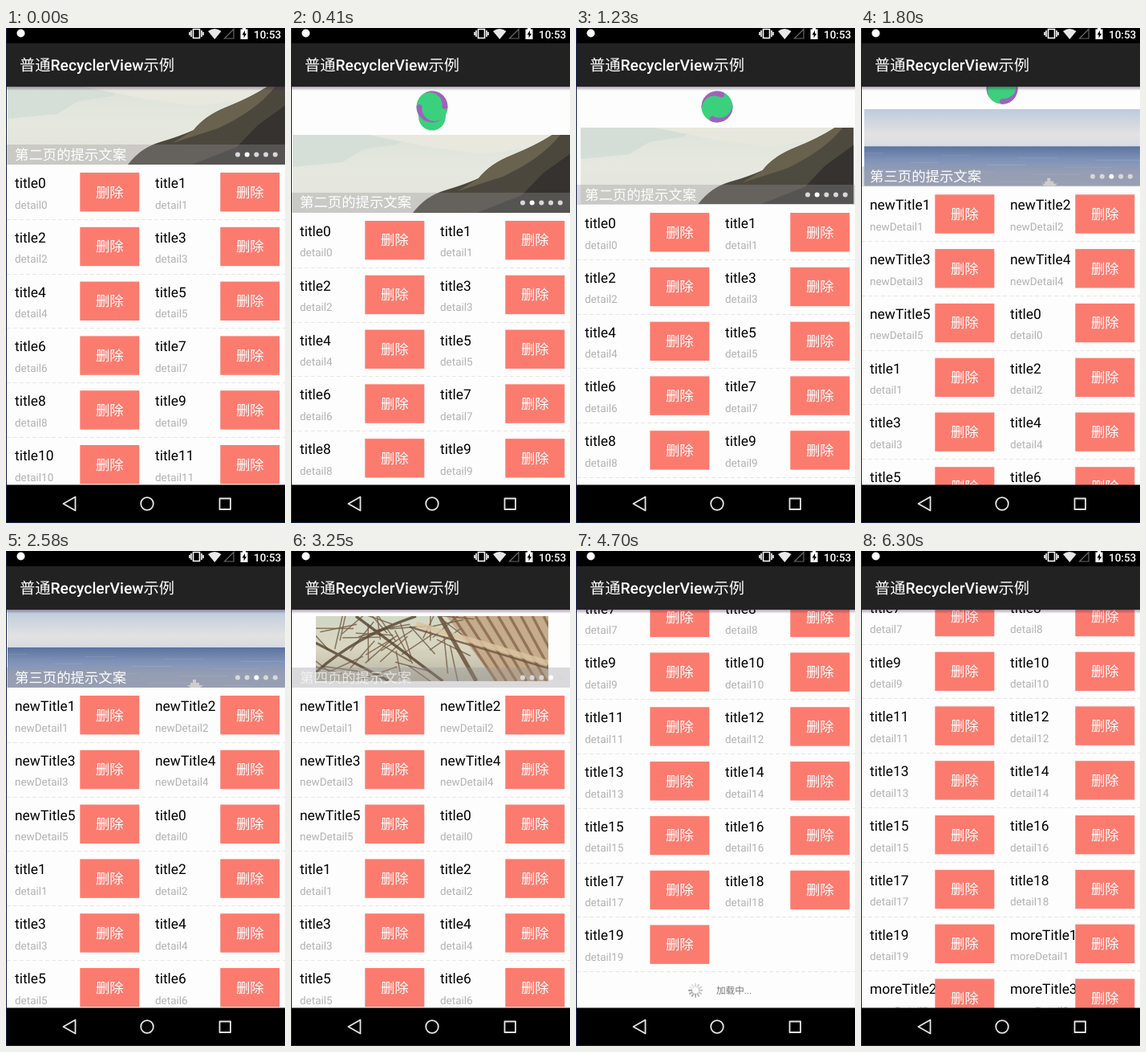
Write an HTML page with a canvas that moves like this. It is 348 px wide and 616 px high and loops after 6.36 s.

```html
<!DOCTYPE html>
<html lang="zh-CN">
<head>
<meta charset="utf-8">
<title>RecyclerView</title>
<style>
  html, body { margin: 0; width: 100%; height: 100%; overflow: hidden; background: #000; }
  canvas { display: block; }
</style>
</head>
<body>
<canvas id="stage" width="348" height="616"></canvas>
<script>
const ctx = document.getElementById('stage').getContext('2d');
const LOOP = 6360, STEP = 50, W = 348, H = 616, TOP = 73, BOTTOM = 568.5;
const BANNER_X = 2, BANNER_W = 348, BANNER_H = 97, ROW_H = 67.8;
const FAMILY = 'Roboto, "Noto Sans CJK SC", "Noto Sans CJK", sans-serif';
ctx.textRendering = 'geometricPrecision';

const clamp = x => Math.min(1, Math.max(0, x));
const ramp = (t, a, b) => { const u = clamp((t - a) / (b - a)); return u * u * (3 - 2 * u); };
const easeOut = (t, a, b) => 1 - (1 - clamp((t - a) / (b - a))) ** 3;
const noise = n => { const v = Math.sin(n * 12.9898) * 43758.5453; return v - Math.floor(v); };

function rect(x, y, w, h, color) {
  ctx.fillStyle = color;
  ctx.fillRect(x, y, w, h);
}
function disc(x, y, r, color) {
  ctx.fillStyle = color;
  ctx.beginPath();
  ctx.arc(x, y, r, 0, 7);
  ctx.fill();
}
function shape(d, color) {
  ctx.fillStyle = color;
  ctx.fill(new Path2D(d));
}
function line(d, color, width) {
  ctx.strokeStyle = color;
  ctx.lineWidth = width;
  ctx.stroke(new Path2D(d));
}
function text(s, x, y, size, color, weight = 400, align = 'left') {
  ctx.font = `${weight} ${size}px ${FAMILY}`;
  ctx.textAlign = align;
  ctx.fillStyle = color;
  ctx.fillText(s, x, y);
  return x + ctx.measureText(s).width;
}
function gradient(y0, y1, ...colors) {
  const g = ctx.createLinearGradient(0, y0, 0, y1);
  colors.forEach((c, i) => g.addColorStop(i / (colors.length - 1), c));
  return g;
}

// Banner pictures, drawn in a 348 x 97 box
function hill() {
  rect(0, 0, BANNER_W, BANNER_H, gradient(0, 97, '#dde3da', '#e6e8df', '#e2e3da'));
  shape('M0 0H150L130 12 88 18 62 34 0 40Z', '#d5dfd8');
  shape('M95 0H325L300 16 235 24 170 15Z', '#e8e8de');
  shape('M150 97Q166 76 190 69T232 54Q246 36 274 25T324 0H348V97Z', '#4b473d');
  shape('M232 54Q246 36 274 25T324 0H334Q310 30 262 52L206 70Z', '#69624f');
  shape('M348 22L312 48 286 75 230 97H348Z', '#35322f');
}
function sea() {
  rect(0, 0, BANNER_W, 49, gradient(0, 49, '#bccadd', '#d0d6df', '#e2e2e2', '#d5d9e0'));
  rect(0, 47, BANNER_W, 50, gradient(47, 97, '#5a729d', '#7d91b5', '#93a2c0', '#9aa5c0'));
  for (let i = 0; i < 14; i++)
    rect((i * 97) % 330, 55 + i * 3, 24 + (i * 13) % 40, 1, 'rgba(255,255,255,.1)');
  shape('M224 94H244L240 97H228Z M231 87H235V94H231Z M228 91H239V94H228Z', '#eceae6');
}
function girders() {
  rect(0, 0, BANNER_W, BANNER_H, gradient(0, 97, '#c9d0bc', '#d2ceb4', '#a8a58f'));
  shape('M195 0H348V97H270Z', '#c2a583');
  for (let i = 0; i < 11; i++) line(`M${205 + i * 17} 0L${270 + i * 15} 97`, '#8a6a4c', 4);
  for (let i = 0; i < 45; i++) {
    const x = noise(i) * 210, y = noise(i + 50) * 97;
    const angle = noise(i + 100) * Math.PI, dx = Math.cos(angle) * 28, dy = Math.sin(angle) * 28;
    line(`M${x - dx} ${y - dy}L${x + dx} ${y + dy}`, '#77614a', 1.8);
  }
  line('M0 84Q60 30 150 0M0 40L110 97M60 0L190 97', '#594734', 4);
  line('M150 12L348 70', '#dcc5a1', 8);
  line('M140 16L348 78', '#715640', 3);
  line('M185 0L240 97', '#675039', 6);
}
const pictures = [null, hill, sea, girders];

function picture(index, amount) {
  if (amount <= 0) return;
  ctx.save();
  ctx.globalAlpha = amount;
  ctx.translate(BANNER_W / 2, BANNER_H / 2);
  ctx.scale(amount, amount);
  ctx.translate(-BANNER_W / 2, -BANNER_H / 2);
  ctx.beginPath();
  ctx.rect(0, 0, BANNER_W, BANNER_H);
  ctx.clip();
  pictures[index]();
  ctx.restore();
}
function banner(t, y) {
  const page = 1 + ramp(t, 1140, 1845) + ramp(t, 2720, 3435);
  const from = Math.floor(page), part = page - from, current = Math.round(page);
  ctx.save();
  ctx.translate(BANNER_X, y);
  const layers = [[from, 1 - part], [from + 1, part]].sort((a, b) => a[1] - b[1]);
  layers.forEach(([index, amount]) => picture(index, amount));
  rect(-1, 72, BANNER_W, 25, 'rgba(150,146,154,.34)');
  ctx.globalAlpha = Math.abs(1 - 2 * part);
  text(`第${'一二三四五'[current]}页的提示文案`, 9, 90.5, 17.4, '#fff');
  ctx.globalAlpha = 1;
  for (let i = 0; i < 5; i++) disc(287 + i * 11.7, 84.5, 3, i === current ? '#fff' : '#d8d8da');
  ctx.restore();
}

function refreshDrop(t, pull) {
  if (pull <= 0) return;
  const R = 19.5, stretch = Math.max(0, pull - 50);
  ctx.save();
  ctx.translate(176, TOP + Math.min(pull, 50) - 25);
  if (stretch) {
    const pinch = clamp(stretch / 59), r = R - 15.5 * pinch, end = stretch + R - r;
    const bend = (R + r) / 2 - 3.5 * pinch, mid = end * .42;
    shape(`M${-R} 0Q${-bend} ${mid} ${-r} ${end}A${r} ${r} 0 0 0 ${r} ${end}Q${bend} ${mid} ${R} 0Z`, '#3bd07c');
  }
  disc(0, 0, R, '#3bd07c');
  ctx.rotate(Math.max(0, t - 1000) / 800 * Math.PI * 2.5);
  for (let i = 0; i < 2; i++) {
    shape('M19.5 1A19.5 19.5 0 0 0-12.5-15A16 16 0 0 1 12.5 1Q16 5 19.5 1Z', '#a25fc0');
    ctx.rotate(Math.PI);
  }
  ctx.restore();
}

const series = (prefix, first, count) => Array.from({ length: count }, (_, i) => [prefix, first + i]);
const cap = s => s[0].toUpperCase() + s.slice(1);
const label = (prefix, word) => prefix ? prefix + cap(word) : word;

function cell([prefix, n], x, y) {
  text(label(prefix, 'title') + n, x + 10, y + 29, 17.4, '#000');
  text(label(prefix, 'detail') + n, x + 10, y + 54.5, 13.5, '#b2b2b2');
  rect(x + 91.3, y + 10, 74, 48.4, '#fb7c6f');
  text('删除', x + 128.3, y + 40.5, 17.4, '#fff', 400, 'center');
}
function footer(t, y) {
  ctx.save();
  ctx.translate(149, y + 23.5);
  const step = Math.floor(t / STEP);
  for (let i = 0; i < 12; i++) {
    const shade = ((i - step) % 12 + 12) % 12 / 11;
    ctx.save();
    ctx.rotate(i * Math.PI / 6);
    rect(-1, -9, 2, 5, `rgba(110,110,110,${.15 + .5 * shade})`);
    ctx.restore();
  }
  ctx.restore();
  text('加载中...', 175, y + 28, 11.6, '#777');
}
function list(t, y) {
  const loaded = t >= 4900;
  const items = [
    ...(t >= 1600 ? series('new', 1, 5) : []),
    ...series('', 0, 20),
    ...(loaded ? series('more', 1, 5) : [])
  ];
  const rows = Math.ceil(items.length / 2);
  for (let row = 0; row < rows; row++) {
    const top = y + row * ROW_H;
    if (top > BOTTOM || top + ROW_H < TOP) continue;
    ctx.globalAlpha = row > 12 ? clamp((t - 4930) / 220) : 1;
    items.slice(row * 2, row * 2 + 2).forEach((item, col) => cell(item, 1 + col * 175, top));
    ctx.setLineDash([5, 3]);
    const edge = Math.round(top + ROW_H) + .5;
    line(`M1 ${edge}H${W}`, '#e6e6e6', 1);
    ctx.setLineDash([]);
  }
  ctx.globalAlpha = 1;
  if (!loaded) footer(t, y + rows * ROW_H);
}

function bars() {
  rect(0, 0, W, 19, '#000');
  rect(0, 19, W, 54, '#222');
  rect(0, TOP, W, 5, gradient(TOP, TOP + 5, 'rgba(60,25,65,.4)', 'rgba(60,25,65,0)'));
  let x = text('普通', 17, 53, 19.3, '#fff');
  x = text('RecyclerView', x, 53, 19.3, '#fff', 500);
  text('示例', x, 53, 19.3, '#fff');

  disc(18.5, 6.5, 5, '#fff');
  line('M233.5 1.5H241.5V12.5H233.5ZM231 3V11M244 3V11M229 5V9M246 5V9', '#fff', 1.6);
  shape('M252 4Q260-2 268.5 4L260.3 14Z', '#e8e8e8');
  line('M284 1.5V13H272.5Z', '#666', 1.2);
  shape('M295 0H299V1.5H301.5V14H292.5V1.5H295Z', '#fff');
  shape('M298 3L294.5 8.5H296.6V12.5L300 7H298Z', '#000');
  text('10:53', 309, 12.5, 13.5, '#fff', 500);

  rect(0, BOTTOM, W, H - BOTTOM, '#000');
  ctx.lineJoin = 'round';
  line('M86.5 583.5V600.5L71.5 592Z', '#e6e6e6', 1.8);
  line('M168.2 592A7.8 7.8 0 1 1 183.8 592A7.8 7.8 0 1 1 168.2 592Z', '#e6e6e6', 1.8);
  line('M266.5 585.5H280V599H266.5Z', '#e6e6e6', 1.8);
  ctx.lineJoin = 'miter';
  rect(0, 0, 1, H, '#14224a');
  rect(0, H - 1, W, 1, '#14224a');
}

function draw() {
  const t = Math.floor(performance.now() % LOOP / STEP) * STEP;
  const pull = 109 * ramp(t, 0, 750) - 59 * ramp(t, 800, 1050) - 50 * ramp(t, 1645, 1975);
  const scroll = 125 * ramp(t, 3320, 3600) + 18 * ramp(t, 4230, 4300) + 386 * easeOut(t, 4300, 4760);
  const y = TOP + pull - scroll;
  rect(0, 0, W, H, '#fdfdfd');
  refreshDrop(t, pull);
  if (y + BANNER_H > TOP) banner(t, y);
  list(t, y + BANNER_H);
  bars();
  requestAnimationFrame(draw);
}
draw();
</script>
</body>
</html>
```
